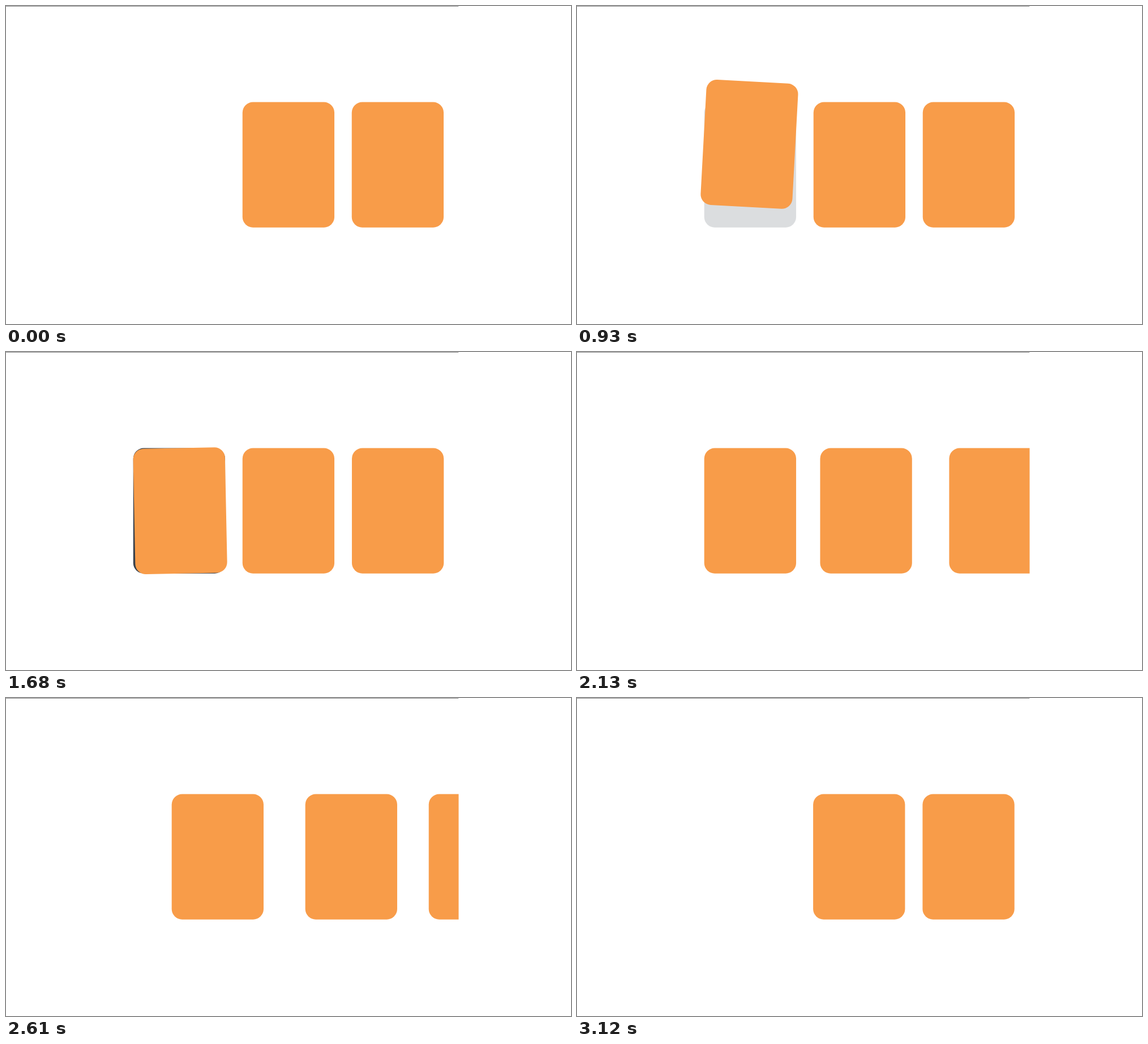
Animation, 998 px wide and 561 px high, one loop 3.15 s. Source, as an HTML page with a canvas:

```html
<!DOCTYPE html>
<html lang="en">
<head>
<meta charset="utf-8">
<title>Cards</title>
<style>
  html, body { margin: 0; width: 100%; height: 100%; overflow: hidden; background: #fff; }
  canvas { display: block; }
</style>
</head>
<body>
<canvas id="stage" width="998" height="561"></canvas>
<script>
const ctx = document.getElementById('stage').getContext('2d');
const LOOP = 3150, STEP = 30, STAGE_W = 799.5;
const W = 162.3, H = 221.2, R = 18.5, GAP = 193;
const X = 305.9, Y = 280.1;
const ORANGE = '#f89c49', DARK = '#39424d';

// Each track: [time, value] keys joined by an ease in and out.
const tracks = {
  x: [[570, 301], [1380, 309.3], [1980, X]],
  y: [[570, 224.2], [1470, Y]],
  turn: [[570, 10], [1410, -7.5], [1770, 0]],
  slide1: [[2250, 0], [3150, GAP]],
  slide2: [[1950, 0], [3150, GAP]],
  slide3: [[1650, 0], [3150, GAP]]
};

const clamp = v => Math.min(1, Math.max(0, v));
const smooth = p => p * p * (3 - 2 * p);

function at(name, t) {
  const keys = tracks[name];
  let value = keys[0][1];
  for (let i = 1; i < keys.length; i++) {
    const [t0, v0] = keys[i - 1], [t1, v1] = keys[i];
    if (t >= t0) value = v0 + (v1 - v0) * smooth(clamp((t - t0) / (t1 - t0)));
  }
  return value;
}

function card(x, y, turn, color, alpha) {
  if (alpha <= 0) return;
  ctx.save();
  ctx.globalAlpha = alpha;
  ctx.fillStyle = color;
  ctx.translate(x, y);
  ctx.rotate(turn * Math.PI / 180);
  ctx.beginPath();
  ctx.roundRect(-W / 2, -H / 2, W, H, R);
  ctx.fill();
  ctx.restore();
}

function slotAlpha(t) {
  if (t < 420 || t >= 1980) return 0;
  return 0.065 + 0.935 * Math.pow(clamp((t - 570) / 1110), 1.85);
}

function draw(t) {
  ctx.fillStyle = '#fff';
  ctx.fillRect(0, 0, 998, 561);
  ctx.save();
  ctx.beginPath();
  ctx.rect(0, 0, STAGE_W, 561);
  ctx.clip();
  card(X, Y, 0, DARK, slotAlpha(t));
  card(X + 2 * GAP + at('slide3', t), Y, 0, ORANGE, 1);
  card(X + GAP + at('slide2', t), Y, 0, ORANGE, 1);
  card(at('x', t) + at('slide1', t), at('y', t), at('turn', t), ORANGE, clamp(t / 220));
  ctx.fillStyle = '#8a8a8a';
  ctx.fillRect(0, 0, STAGE_W, 1);
  ctx.restore();
}

const start = performance.now();
function tick() {
  const t = (performance.now() - start) % LOOP;
  draw(Math.floor(t / STEP) * STEP);
  requestAnimationFrame(tick);
}
tick();
</script>
</body>
</html>
```
